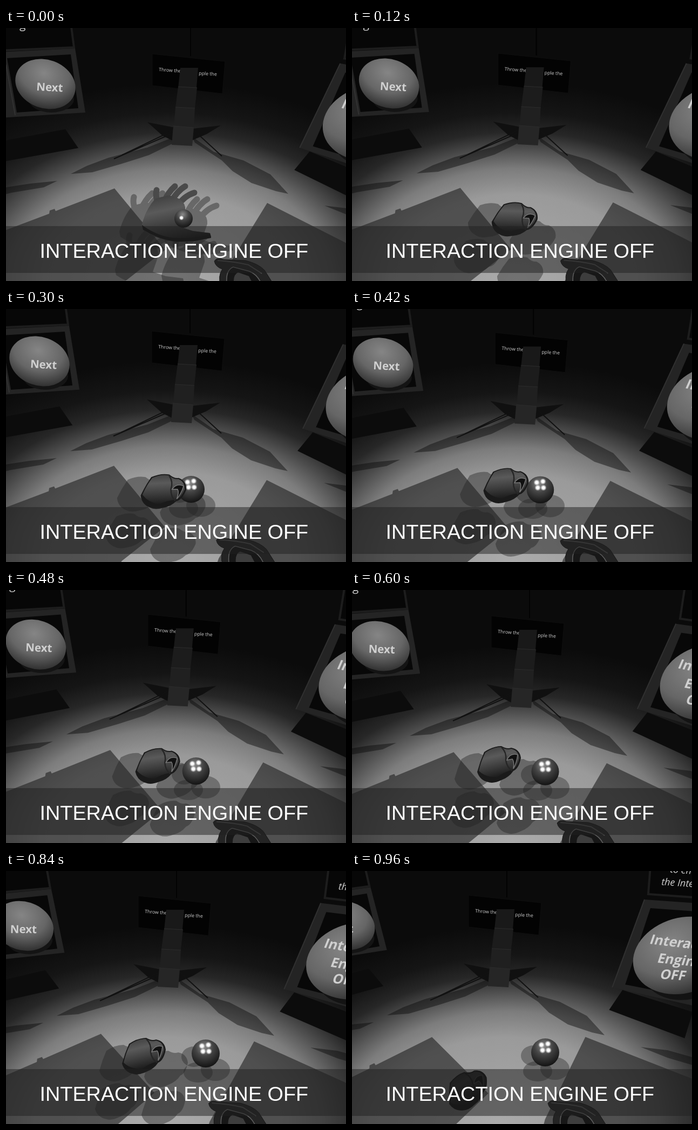
Animation of 630x470 px, one loop 1020 ms. Source, as an HTML page:

```html
<!DOCTYPE html>
<html lang="en">
<head>
<meta charset="utf-8">
<title>Interaction Engine off</title>
<style>
  html, body { margin: 0; width: 100%; height: 100%; overflow: hidden; background: #0b0b0b; }
  svg { display: block; width: 100vw; height: 100vh; }
  .sign { font-family: "Open Sans", "Noto Sans", sans-serif; fill: #d0d0d0; }
  .caption { font: 37.8px "Liberation Sans", Arial, sans-serif; fill: #fff; }
  .shade { fill: #0a0a0a; fill-opacity: .45; }
  .mat { fill: #222; fill-opacity: .62; }
  .shadow { color: #222; opacity: .42; }
</style>
</head>
<body>
<svg viewBox="0 0 630 470" preserveAspectRatio="none">
  <defs>
    <radialGradient id="light" gradientUnits="userSpaceOnUse" cx="0" cy="0" r="400"
        gradientTransform="translate(305 470) scale(1.45 1)">
      <stop offset="0" stop-color="#ababab"/>
      <stop offset=".4" stop-color="#9a9a9a"/>
      <stop offset=".52" stop-color="#7c7c7c"/>
      <stop offset=".61" stop-color="#4e4e4e"/>
      <stop offset=".69" stop-color="#272727"/>
      <stop offset=".78" stop-color="#151515"/>
      <stop offset=".92" stop-color="#0b0b0b"/>
    </radialGradient>
    <radialGradient id="orb" cx=".42" cy=".3" r=".75">
      <stop offset="0" stop-color="#858585"/>
      <stop offset=".55" stop-color="#666"/>
      <stop offset="1" stop-color="#2b2b2b"/>
    </radialGradient>
    <radialGradient id="ballFill" cx=".45" cy=".28" r=".7">
      <stop offset="0" stop-color="#8a8a8a"/>
      <stop offset=".45" stop-color="#444"/>
      <stop offset="1" stop-color="#161616"/>
    </radialGradient>
    <radialGradient id="glow">
      <stop offset=".4" stop-color="#fff"/>
      <stop offset="1" stop-color="#fff" stop-opacity="0"/>
    </radialGradient>
    <linearGradient id="skin" x1=".3" y1="0" x2=".62" y2="1">
      <stop offset="0" stop-color="#404040"/>
      <stop offset=".3" stop-color="#5a5a5a"/>
      <stop offset=".6" stop-color="#3e3e3e"/>
      <stop offset="1" stop-color="#161616"/>
    </linearGradient>
    <path id="palm" d="M252 365Q260 335 277 317L300 311Q334 316 332 340L322 369L346 377L378 381L380 389L348 396L315 397Q280 393 254 375Z"/>
    <g id="openForm">
      <use href="#palm" fill="currentColor"/>
      <path d="M282 325Q276 312 279 301M292 325Q300 305 313 294M304 325Q318 302 332 294M318 330Q330 312 349 306"
          fill="none" stroke="currentColor" stroke-width="11" stroke-linecap="round"/>
    </g>
    <path id="fistForm" fill="currentColor"
        d="M-41 14Q-36 -5 -28 -23Q-12 -34 4 -34Q14 -28 22 -31Q38 -28 40 -12Q36 8 26 12Q18 24 4 29Q-10 36 -20 33Q-36 30 -41 14Z"/>
  </defs>

  <rect width="630" height="470" fill="#0b0b0b"/>

  <g id="floor">
    <rect x="-200" y="-100" width="1100" height="800" fill="url(#light)"/>
    <path class="mat" d="M201 298L295 412L215 475L150 600H-200V451L80 345L81 339L90 336L92 340Z"/>
    <path class="mat" d="M484 325L860 516V620H340L395 470Z"/>
  </g>

  <g id="tower">
    <path class="shade" d="M310 203L262 222L190 241L150 256L120 271L160 268L215 252L265 236L310 214Z"/>
    <path class="shade" d="M-40 302L45 289L95 284L70 296L10 306L-40 318Z"/>
    <path class="shade" d="M345 202L385 230L440 246L490 272L523 308L500 303L455 288L420 266L400 246L350 213Z"/>
    <path class="shade" d="M590 330L640 336L760 370V385L640 350Z"/>
    <path d="M262 175L318 186L312 211L290 200ZM346 187L398 181L372 197L344 209Z" fill="#101010"/>
    <path d="M310 190L215 236M308 196L200 243M348 190L400 238" stroke="#111" stroke-width="2" fill="none"/>
    <path d="M342 -20V52" stroke="#020202" stroke-width="2"/>
    <path d="M271 48L406 62L401 122L271 107Z" fill="#030303" stroke="#0f0f0f"/>
    <g class="sign" font-size="8.8">
      <text transform="translate(283 80) rotate(4)">Throw the</text>
      <text transform="translate(357 87) rotate(3)">pple the</text>
    </g>
    <path d="M323 74H356L353 111H319Z" fill="#191919"/>
    <path d="M319 109L354 111L350 149L314 147Z" fill="#1c1c1c"/>
    <path d="M314 147L350 149L348 186L311 183Z" fill="#202020"/>
    <path d="M310 182L348 185L345 219L307 217Z" fill="#262626"/>
    <path d="M319 109L354 111M314 147L350 149M310 182L348 185" stroke="#2c2c2c"/>
  </g>

  <g id="left">
    <path d="M-60 220L110 188L134 223L-60 258Z" fill="#0c0c0c"/>
    <path d="M-60 -40H116L126 36L-60 44Z" fill="#070707" stroke="#1d1d1d" stroke-width="4"/>
    <text class="sign" font-size="21" x="25" y="1">g</text>
    <path d="M-60 47L128 38L147 157L-60 170Z" fill="#242424"/>
    <path d="M2 56L120 49L134 149L20 157Z" fill="#080808"/>
    <path d="M0 68L17 162" stroke="#323232" stroke-width="2"/>
    <ellipse cx="84" cy="132" rx="42" ry="25" fill="#141414"/>
    <ellipse cx="73" cy="104" rx="57" ry="45" transform="rotate(20 73 104)" fill="url(#orb)"/>
    <g id="word">
      <text class="sign" font-size="20.5" font-weight="700" transform="translate(56 116) rotate(3)">Next</text>
    </g>
  </g>

  <g id="right">
    <path d="M497 221L627 262L612 311L472 258Z" fill="#0c0c0c"/>
    <path d="M553 -60L545 43L800 62V-60Z" fill="#070707" stroke="#1d1d1d" stroke-width="4"/>
    <g class="sign" font-size="18" font-style="italic">
      <text transform="translate(585 3) rotate(4)">to enable</text>
      <text transform="translate(569 26) rotate(4)">the Interaction</text>
    </g>
    <path d="M538 53L800 72V290L478 216Z" fill="#242424"/>
    <path d="M549 69L780 86V266L502 211Z" fill="#080808"/>
    <path d="M538 53L478 216" stroke="#303030" stroke-width="2"/>
    <ellipse cx="606" cy="190" rx="70" ry="50" fill="#131313"/>
    <ellipse cx="609" cy="157" rx="94" ry="70" transform="rotate(-16 609 157)" fill="url(#orb)"/>
    <g class="sign" font-size="25" font-weight="700">
      <text transform="translate(546 135) rotate(7) skewX(-12)">Interaction</text>
      <text transform="translate(560 170) rotate(6) skewX(-12)">Engine</text>
      <text transform="translate(565 200) rotate(4) skewX(-12)">OFF</text>
    </g>
  </g>

  <g id="openShadows"></g>
  <g id="fistShadows"></g>
  <g id="ballShadows" fill="#222" fill-opacity=".38">
    <ellipse cx="-22" cy="6" rx="23" ry="19"/>
    <ellipse cx="-14" cy="35" rx="27" ry="19"/>
    <ellipse cx="18" cy="30" rx="27" ry="21"/>
  </g>

  <g id="guest">
    <path d="M386 433Q391 425 403 430L444 432Q468 438 479 450L498 480H398Q392 460 401 448Q388 444 386 433Z"
        fill="#242424" stroke="#151515"/>
    <path d="M410 480Q405 451 421 444L451 452Q468 459 475 480Z" fill="#171717" stroke="#606060" stroke-width="1.5"/>
    <path d="M423 480Q419 459 430 454L450 461L460 480Z" fill="#3d3d3d"/>
    <path d="M392 432Q425 434 449 440L474 456" fill="none" stroke="#4d4d4d" stroke-width="2"/>
  </g>

  <g id="open">
    <use href="#openForm" color="#4a4a4a"/>
    <use href="#palm" fill="url(#skin)"/>
    <path d="M252 366Q285 390 318 390Q350 391 379 384L380 390L348 396L315 397Q280 391 254 375Z" fill="#171717"/>
  </g>
  <g id="ball">
    <circle r="26" fill="url(#ballFill)"/>
    <g id="dots" fill="url(#glow)">
      <circle cx="-7" cy="-14" r="6"/><circle cx="5" cy="-16" r="6"/>
      <circle cx="-5" cy="-4" r="6"/><circle cx="6" cy="-4" r="6"/>
    </g>
    <circle id="glint" cx="-6" cy="-2" r="7" fill="url(#glow)"/>
  </g>
  <g id="fist">
    <use href="#fistForm" color="#1a1a1a"/>
    <path d="M-38 12Q-34 -6 -26 -22Q-10 -33 4 -32Q14 -26 22 -29Q35 -26 37 -12Q34 5 24 10Q8 14 -4 24Q-26 24 -38 12Z" fill="url(#skin)"/>
    <path d="M4 -32Q14 -22 12 -8Q14 6 24 12" fill="none" stroke="#262626" stroke-width="2.5"/>
    <path d="M14 -8Q20 -22 34 -18Q32 -2 26 8Q28 -6 24 -10Z" fill="#111" stroke="#777" stroke-width="1.5"/>
    <use id="dim" href="#fistForm" color="#0c0c0c"/>
  </g>

  <rect y="368" width="630" height="87" fill="#202020" fill-opacity=".5"/>
  <text class="caption" x="62.5" y="427">INTERACTION ENGINE OFF</text>
</svg>

<script>
const LOOP = 1020, STEP = 60, GRAB = 120;

// Key points: time, then values.
const panKeys = [[0, 0], [300, -1], [600, -13], [840, -26], [960, -55]];
const bobKeys = [[0, 0], [120, -1], [300, -7], [600, 0], [960, -3]];
const slideKeys = [[0, 0], [600, -22], [840, -41], [960, -87]];
const ballKeys = [ // x, y, radius
  [0, 329, 354, 17], [120, 326, 352, 17], [300, 343, 335, 25], [840, 370, 339, 26], [960, 358, 337, 26]];
const fistKeys = [ // x, y, angle
  [120, 302, 357, 15], [420, 286, 329, 8], [600, 273, 324, 0], [840, 256, 344, 0], [960, 215, 407, -18]];

const $ = id => document.getElementById(id);
const place = (id, transform) => $(id).setAttribute("transform", transform);
const show = (id, opacity) => $(id).setAttribute("opacity", +opacity);
const ramp = (t, from, to) => Math.min(1, Math.max(0, (t - from) / (to - from)));

function at(keys, t) {
  const i = Math.max(1, keys.findIndex(k => k[0] >= t));
  const [a, b] = [keys[i - 1], keys[i]];
  const k = ramp(t, a[0], b[0]);
  return a.map((v, j) => v + (b[j] - v) * k).slice(1);
}

// Several lamps: each casts one copy of the hand.
function castShadows(id, form) {
  for (const offset of [[-42, 13], [41, 24], [-50, 84], [36, 95]]) {
    const use = document.createElementNS("http://www.w3.org/2000/svg", "use");
    use.setAttribute("href", form);
    use.setAttribute("class", "shadow");
    use.setAttribute("transform", `translate(${offset})`);
    $(id).append(use);
  }
}
castShadows("openShadows", "#openForm");
castShadows("fistShadows", "#fistForm");

function draw(t) {
  const [pan] = at(panKeys, t), [bob] = at(bobKeys, t), [slide] = at(slideKeys, t);
  const turn = pan / 10;
  place("floor", `translate(${pan * .95} ${bob}) rotate(${turn} 342 311)`);
  place("tower", `translate(${pan} ${bob})`);
  place("left", `translate(${slide} ${bob}) rotate(${turn} 74 104)`);
  place("word", `translate(${turn * 3} 0)`);
  place("right", `translate(${71 + pan * 1.27 - bob} ${18 + turn * 3.3}) rotate(${5.4 + turn} 598 159)`);
  place("guest", `translate(${pan * .45 - bob * .6} ${bob / 2})`);

  const [bx, by, r] = at(ballKeys, t);
  const free = ramp(t, GRAB, 240);
  place("ball", `translate(${bx} ${by}) scale(${r / 26})`);
  place("ballShadows", `translate(${bx} ${by})`);
  show("ballShadows", free);
  show("dots", free);

  const isOpen = t < GRAB;
  const curl = t / GRAB;
  const fold = `translate(305 360) scale(${1 - curl * .24} ${1 - curl * .4}) translate(-305 -360)`;
  for (const id of ["open", "openShadows", "glint"]) show(id, isOpen);
  place("open", fold);
  place("openShadows", fold);

  const [fx, fy, angle] = at(fistKeys, t);
  const dim = ramp(t, 840, 960);
  place("fist", `translate(${fx} ${fy}) rotate(${angle})`);
  place("fistShadows", `translate(${fx} ${fy}) rotate(${angle})`);
  show("fist", !isOpen);
  show("fistShadows", isOpen ? 0 : 1 - dim);
  show("dim", dim * .7);
}

const start = performance.now();
function tick() {
  const t = (performance.now() - start) % LOOP;
  draw(Math.floor(t / STEP) * STEP);
  requestAnimationFrame(tick);
}
tick();
</script>
</body>
</html>
```
